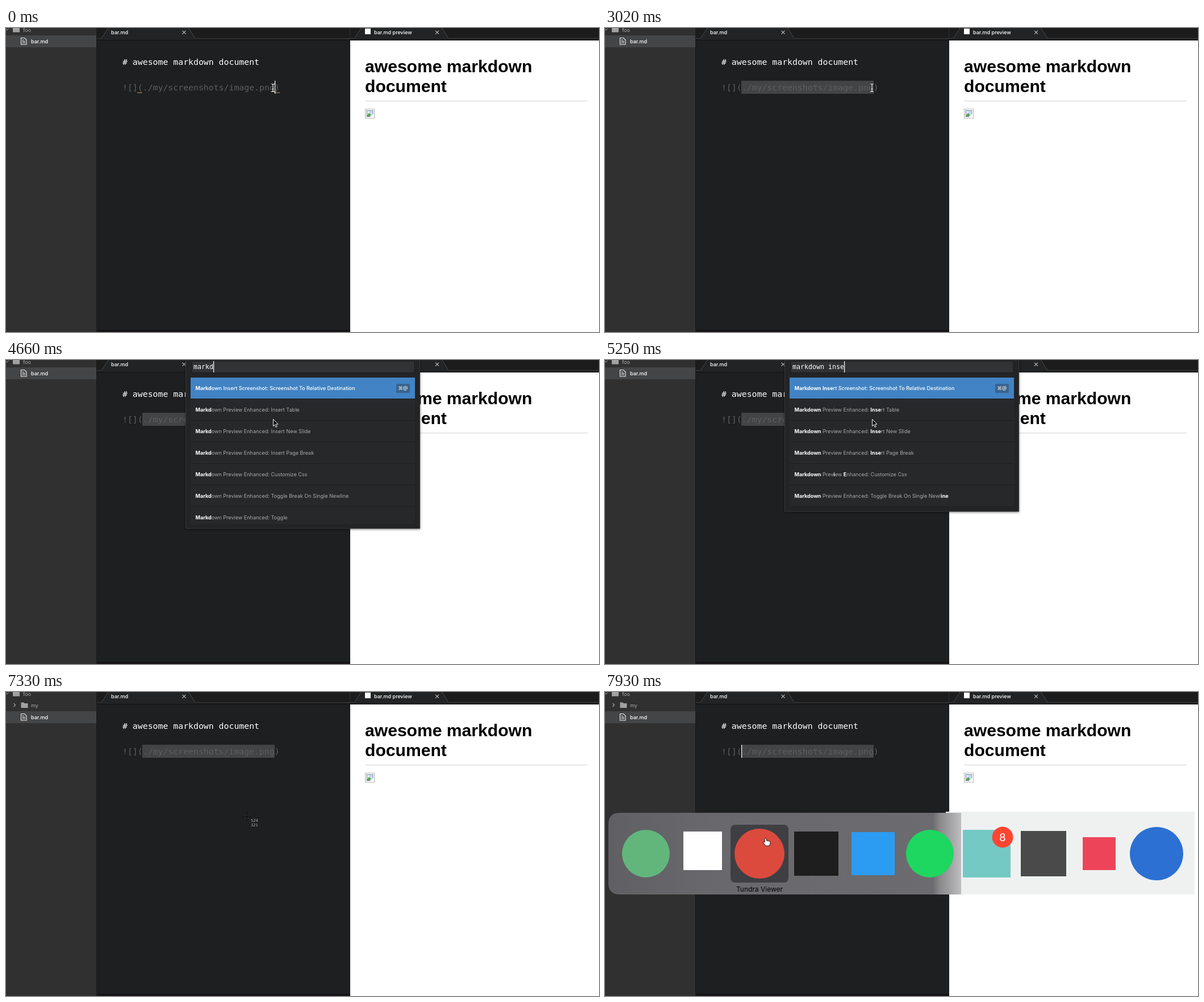
Recreate the animation shown at these times as an HTML page. Size 1044 by 536 pixels, loop 8000 ms.

```html
<!DOCTYPE html>
<html lang="en">
<head>
<meta charset="utf-8">
<title>Inserting a screenshot into markdown</title>
<style>
  html, body { margin: 0; width: 100%; height: 100%; overflow: hidden; background: #1d1f21; }
  svg { display: block; }
  text { font: 9.05px Inter, "Open Sans", sans-serif; fill: #a8a9ab; white-space: pre; }
  .white { fill: #fff; font-weight: 500; }
  .hit { fill: #fff; font-weight: 700; }
  .code { font: 14.84px "DejaVu Sans Mono", monospace; }
  .query { font: 11.63px "DejaVu Sans Mono", monospace; fill: #fff; }
  .title { font: bold 30.1px "Liberation Sans", Arial, sans-serif; fill: #000; }
  .key { font-size: 8.6px; font-weight: 700; fill: #d2d3d5; text-anchor: middle; }
  .coord { font: 7px "DejaVu Sans Mono", monospace; fill: #c4c4c4; stroke: #111; stroke-width: 1px; paint-order: stroke; }
  .app { font-size: 12px; fill: #000; text-anchor: middle; }
  .badge { font-size: 19px; fill: #fff; text-anchor: middle; }
  #palette { filter: drop-shadow(0 1px 2px rgba(0, 0, 0, .5)); }
</style>
</head>
<body>
<svg id="stage" width="1044" height="536" viewBox="0 0 1044 536"></svg>
<script>
const LOOP = 8000;
const CHAR = 8.935;
const CODE_X = 205;
const ROW = 38;
const LINK = '![](./my/screenshots/image.png)';
const stage = document.getElementById('stage');

const rect = (x, y, w, h, fill, more = '') =>
  `<rect x="${x}" y="${y}" width="${w}" height="${h}" fill="${fill}" ${more}/>`;
const disc = (x, y, r, fill) => `<circle cx="${x}" cy="${y}" r="${r}" fill="${fill}"/>`;
const label = (x, y, text, cls = '', more = '') =>
  `<text x="${x}" y="${y}" class="${cls}" ${more}>${text}</text>`;
const line = (d, color, width = 1) =>
  `<path d="${d}" fill="none" stroke="${color}" stroke-width="${width}"/>`;
const group = (id, body, more = '') => `<g id="${id}" ${more}>${body}</g>`;

const folder = (x, y) => `<path d="M${x} ${y}h5l1 1.5h6v8h-12z" fill="#a2a2a2"/>`;
const cross = x => line(`M${x - 3} 4.7l6 6m0-6l-6 6`, '#c4c4c4', 1.1);
const tab = (x, right) =>
  `<path d="M${x} 18.5L${x + 13} -1H${right - 12}L${right} 18.5V21H${x}z" fill="#222324"/>` +
  line(`M${x} 18.5L${x + 13} -1M${right - 12} -1L${right} 18.5`, '#4a4a4b');

const sidebar =
  rect(0, 0, 160, 536, '#303030') +
  rect(159, 0, 1, 536, '#1a1a1a') +
  line('M0 1.5l2 2.5l2.5-3', '#a2a2a2') + folder(12, -2) + label(30, 6.7, 'foo') +
  group('subfolder',
    line('M13.5 20l3 3l-3 3', '#a2a2a2', 1.2) + folder(26.5, 18.5) + label(44, 27, 'my')) +
  group('file',
    rect(0, 13, 159, 21, '#444546') +
    line('M26.5 17.5h6l3.5 3.5v8h-9.5zM28.5 21h3m-3 2.5h5.5m-5.5 2.5h5.5', '#f0f0f0', 1.1) +
    label(44, 27, 'bar.md', 'white'));

const editor =
  rect(160, 0, 884, 536, '#1d1f21') +
  rect(160, 0, 884, 19, '#1c1c1d') +
  tab(168, 333) + tab(613, 779) +
  line('M160 18.5H168M333 18.5H613M779 18.5H1044', '#3d3d3e') +
  rect(160, 21, 884, 1, '#121314') +
  rect(605, 0, 1, 19, '#303031') +
  label(185, 10.8, 'bar.md', 'white') + cross(313.5) +
  rect(632, 1, 10, 10, '#fff') +
  label(648, 10.8, 'bar.md preview', 'white') + cross(759) +
  rect(160, 532, 446, 4, '#171516') +
  label(CODE_X, 65.4, '# awesome markdown document', 'code', 'style="fill:#fff"') +
  rect(240, 93, 0, 23, '#434445', 'id="selection"') +
  label(CODE_X, 109.6, LINK, 'code', 'style="fill:#5d5e5f"') +
  group('brackets', rect(231, 113.5, 9, 1, '#c9a66a') + rect(473, 113.5, 9, 1, '#c9a66a')) +
  rect(473, 93, 1.2, 23, '#fff', 'id="caret"');

const preview =
  rect(606, 22, 438, 514, '#fff') +
  label(632, 77.5, 'awesome markdown', 'title') +
  label(632, 113, 'document', 'title') +
  rect(632, 128, 392, 1.4, '#dedede') +
  rect(632.5, 143, 16, 16, '#fff', 'stroke="#b4b4b4"') +
  rect(635, 145.5, 11, 11, '#c4d8f3', 'stroke="#8f9499"') +
  '<path d="M635.5 156v-2l4-4l3 3l-2 3z" fill="#57a64a"/>' +
  '<path d="M641 157l6-6v6z" fill="#fff"/>' + disc(638, 148.5, 1.3, '#fff');

const palette = group('palette',
  rect(316.5, -10, 412, 307, '#232426', 'id="frame" stroke="#38393a"') +
  rect(327, 2, 392, 20.5, '#303234', 'stroke="#191a1b"') +
  label(330, 16.2, '', 'query', 'id="query"') +
  rect(330, 2, 1.2, 20, '#fff', 'id="queryCaret"') +
  group('rows', '', 'clip-path="url(#listClip)"'));

const switcher = group('switcher',
  rect(600, 211, 438, 146, '#eff1f1') +
  '<path d="M26 213H627V357H26Q6 357 6 337V233Q6 213 26 213z" fill="url(#glass)"/>' +
  rect(221, 234, 102, 102, '#3f3f43', 'id="chosen" rx="8"') +
  disc(72, 285, 42, '#62b67c') +
  rect(138, 246, 68, 68, '#fff') +
  disc(272, 285, 44, '#db4a3d') +
  rect(333, 246, 78, 78, '#1e1e1e') +
  rect(434, 247, 76, 76, '#2b9cf2') +
  disc(572, 285, 42, '#1ed760') +
  rect(630, 243, 84, 84, '#74c9c4') +
  disc(700, 256, 18.5, '#fc4632') + label(700, 263, '8', 'badge') +
  rect(732, 245, 80, 80, '#4a4a4a') +
  rect(841, 256, 58, 58, '#ee4459') +
  disc(971, 285, 47, '#2b70d2') +
  label(272, 352, 'Tundra Viewer', 'app', 'id="appName"'));

const beam = 'M-3 -7q3 0 3 2v10q0 2-3 2M3 -7q-3 0-3 2v10q0 2 3 2M-1.5 2h3';
const pointers =
  group('ibeam', line(beam, '#111', 2.6) + line(beam, '#fff', 1.2)) +
  group('arrow', '<path d="M0 0v12l2.7-2.5l2 4.5l2-1l-2-4.3h3.7z" fill="#000" stroke="#fff"/>') +
  group('crosshair',
    line('M-8 0H8M0 -8V8', '#0c0d0e', 1.2) +
    '<circle r="3.5" fill="none" stroke="#34363a" stroke-width=".7"/>' +
    label(7, 9.3, '', 'coord', 'id="coordX"') + label(7, 16.8, '', 'coord', 'id="coordY"')) +
  group('hand', '<path d="M-3 -6q1.3-1.5 2.6 0l1 4.3q1.8-1 2.6.4q1.8-.6 2.3.8q1.6 0 1.5 1.8q0 3-1.5 6h-6.5q-2.2-3.5-4.5-5.5q.2-2 2.7-.8z" fill="#fff" stroke="#111"/>');

stage.innerHTML =
  `<defs>
    <clipPath id="listClip"><rect x="325" y="31" width="395" height="258"/></clipPath>
    <linearGradient id="glass">
      <stop offset="0" stop-color="#605f63"/><stop offset=".3" stop-color="#69686c"/>
      <stop offset=".92" stop-color="#6c6b6f"/><stop offset=".94" stop-color="#8a898c"/>
      <stop offset="1" stop-color="#bdbdc0"/>
    </linearGradient>
  </defs>` + sidebar + editor + preview + palette + switcher + pointers;

const parts = Object.fromEntries([...stage.querySelectorAll('[id]')].map(el => [el.id, el]));
const show = (name, on) => parts[name].setAttribute('visibility', on ? 'inherit' : 'hidden');
const move = (name, x, y) => parts[name].setAttribute('transform', `translate(${x} ${y})`);

// Value of the latest [time, value] entry reached.
const latest = (steps, t) => steps.reduce((value, [start, next]) => t >= start ? next : value, undefined);
// Alternates on/off at each listed time, beginning with on.
const blink = (times, t) => times.filter(time => t >= time).length % 2 === 0;

const caretIndex = [[0, 30], [630, 27], [780, 26], [930, 21], [1080, 20], [1220, 9], [1370, 8],
  [1970, 7], [2120, 6], [2270, 5], [2420, 4]];
const caretFlips = [150, 630, 3020, 3310, 3760, 6150, 6590, 7030, 7330, 7780];
const typed = [[0, 0], [4360, 1], [4510, 4], [4660, 5], [4810, 7], [4950, 8], [5100, 11], [5250, 13], [5400, 14]];
const ticks = [6150, 6300, 6440, 6590, 6740, 6890, 7030, 7180];

const commands = [
  ['About: View Release Notes'],
  ['Advanced Open File: Toggle', '⌥⌘O'],
  ['Application: About'],
  ['Application: Add Project Folder', '⇧⌘O'],
  ['Application: Bring All Windows To Front'],
  ['Application: Clear Project History'],
  ['Application: Hide', '⌘H'],
];
// Braces mark scattered letters of a loose match.
const matches = [
  ['Markdown Insert Screenshot: Screenshot To Relative Destination', '⌘@'],
  ['Markdown Preview Enhanced: Insert Table'],
  ['Markdown Preview Enhanced: Insert New Slide'],
  ['Markdown Preview Enhanced: Insert Page Break'],
  ['Markdown Prev{i}ew {E}nhanced: Customize Css'],
  ['Markdown Preview Enhanced: Toggle Break On Single Newl{ine}'],
  ['Markdown Preview Enhanced: Toggle'],
];

function results(query) {
  if (!query) return commands;
  if (query.endsWith('inser')) return matches.slice(0, 4);
  return query.includes(' ') ? matches.slice(0, 6) : matches;
}

function highlight(text, query) {
  const [first, second] = query.split(' ');
  let marked = text;
  if (first) marked = marked.replace(new RegExp('^' + first, 'i'), '<$&>');
  if (second) marked = marked.replace(new RegExp('\\b' + second, 'i'), '<$&>').replace(/{/g, '<').replace(/}/g, '>');
  return marked.replace(/[{}]/g, '').replace(/<(.*?)>/g, '<tspan class="hit">$1</tspan>');
}

function commandRow([text, keys], i, query) {
  const y = 31 + ROW * i;
  const width = keys && (keys.length === 3 ? 31 : keys === '⌘@' ? 24 : 22);
  return rect(325, y, 395, ROW - 1, i ? '#27282a' : '#4183c4') +
    rect(325, y + ROW - 1, 395, 1, '#1e1f20') +
    label(333.5, y + 22.3, highlight(text, query), i ? '' : 'white') +
    (keys ? rect(711 - width, y + 11, width, 16, i ? '#3d3e40' : '#38648f', 'rx="1.5"') +
      label(711 - width / 2, y + 22.3, keys, 'key') : '');
}

let shownQuery = null;
function renderPalette(t) {
  const open = t >= 3910 && t < 6150;
  show('palette', open);
  if (!open) return;
  const query = 'markdown inser'.slice(0, latest(typed, t));
  show('queryCaret', t < 5850);
  if (query === shownQuery) return;
  shownQuery = query;
  const list = results(query);
  parts.query.textContent = query;
  parts.queryCaret.setAttribute('x', 330 + query.length * 7);
  parts.frame.setAttribute('height', 10 + Math.min(297, 39 + list.length * ROW));
  parts.rows.innerHTML = list.map((item, i) => commandRow(item, i, query)).join('');
}

function renderEditor(t) {
  const index = latest(caretIndex, t);
  const x = Math.floor(CODE_X + index * CHAR);
  parts.caret.setAttribute('x', x);
  show('caret', blink(caretFlips, t));
  show('brackets', t < 630);
  parts.selection.setAttribute('x', x);
  parts.selection.setAttribute('width', 473 - x);
}

function crosshairAt(t) {
  if (t >= 7630) return [352, 243];
  if (t >= 7480) return [396, 229];
  const p = Math.max(0, ticks.filter(tick => t >= tick).length - 1) / (ticks.length - 1);
  const eased = p * p * (3 - 2 * p);
  return [470 - 46 * eased, 105 + 115 * eased].map(Math.round);
}

function renderPointer(t) {
  const kind = latest([[0, 'ibeam'], [3910, 'arrow'], [6150, 'crosshair'], [7780, 'hand']], t);
  for (const name of ['ibeam', 'arrow', 'crosshair', 'hand']) show(name, name === kind);
  const [x, y] = crosshairAt(t);
  move('ibeam', 470, 105.5);
  move('arrow', 470.5, 104.5);
  move('crosshair', x, y);
  move('hand', t < 7930 ? 306 : 284, t < 7930 ? 257 : 264);
  parts.coordX.textContent = Math.round(524 + (x - 424) * 1.065);
  parts.coordY.textContent = Math.round(321 + (y - 220) * 1.217);
}

function render(t) {
  const saved = t >= 6150;
  show('subfolder', saved);
  move('file', 0, saved ? 21 : 0);
  renderEditor(t);
  renderPalette(t);
  show('switcher', t >= 7780);
  show('appName', t >= 7930);
  parts.chosen.setAttribute('x', t < 7930 ? 121 : 221);
  renderPointer(t);
}

const start = performance.now();
function tick() {
  render((performance.now() - start) % LOOP);
  requestAnimationFrame(tick);
}
tick();
</script>
</body>
</html>
```
